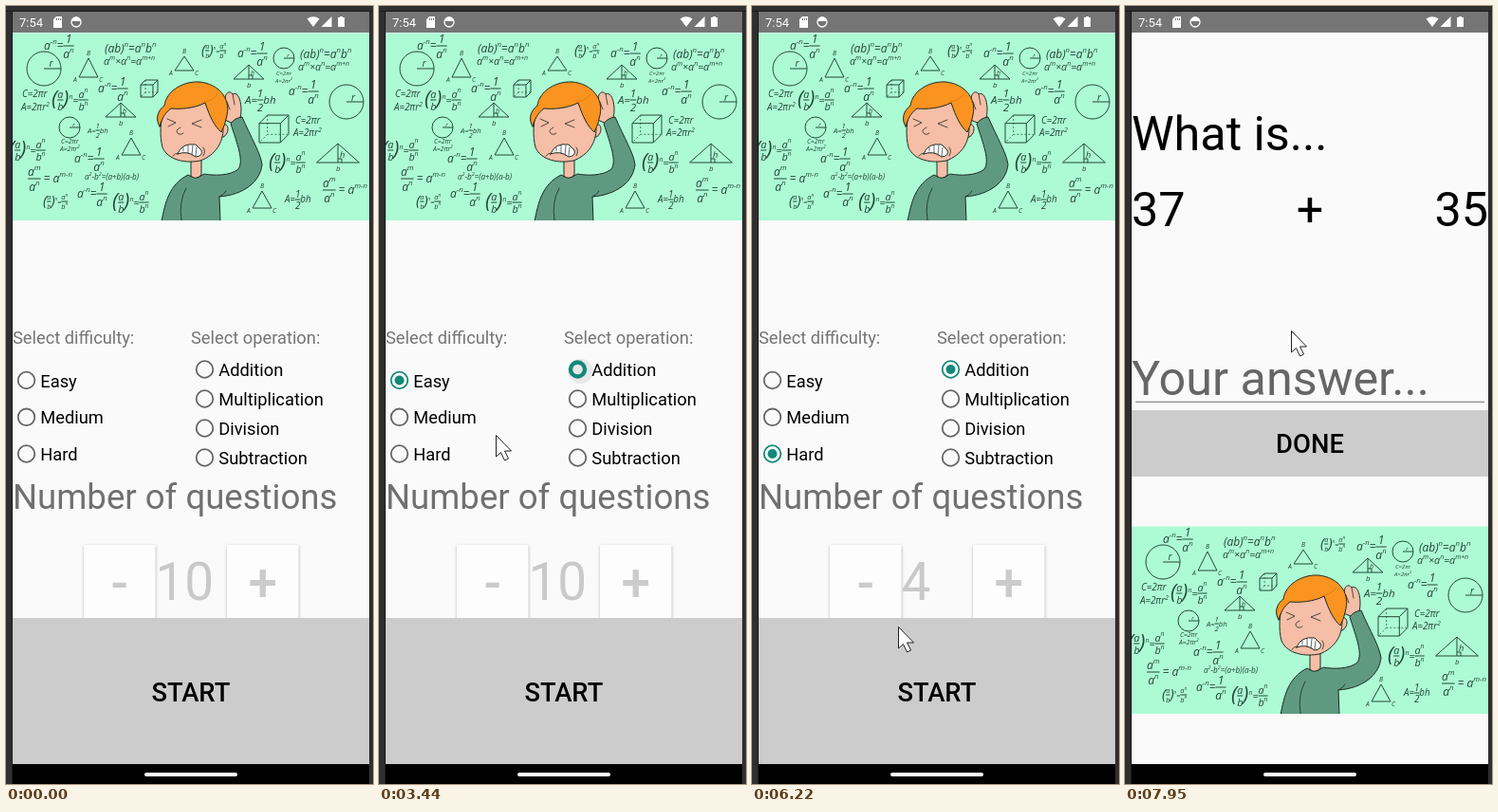
An HTML page with a canvas for the animation above (8 s loop, 387 by 820 pixels).

```html
<!DOCTYPE html>
<html lang="en">
<head>
<meta charset="utf-8">
<title>Math quiz</title>
<style>
html, body { margin: 0; width: 100%; height: 100%; overflow: hidden; background: #2d2d2d; }
canvas { display: block; }
</style>
</head>
<body>
<canvas id="stage" width="387" height="820"></canvas>
<script>
const LOOP = 8000, W = 387, H = 820;
const LEFT = 7, RIGHT = 383;
const INK = '#23483a', PAPER = '#fafafa', MINT = '#adfbd4', BUTTON = '#cccccc', ACCENT = '#12897a';
const stage = document.getElementById('stage').getContext('2d');
let g = stage;

const clamp = v => Math.max(0, Math.min(1, v));

function rect(x, y, w, h, color) {
  g.fillStyle = color;
  g.fillRect(x, y, w, h);
}

function text(s, x, y, size, color, align = 'left', weight = 400) {
  g.font = `${weight} ${size}px Roboto, sans-serif`;
  g.textAlign = align;
  g.fillStyle = color;
  g.fillText(s, x, y);
}

function disc(x, y, r, color) {
  g.beginPath();
  g.arc(x, y, r, 0, 7);
  g.fillStyle = color;
  g.fill();
}

function ring(x, y, r, color, width) {
  g.beginPath();
  g.arc(x, y, r, 0, 7);
  g.lineWidth = width;
  g.strokeStyle = color;
  g.stroke();
}

function shape(d, fill, stroke, width = 1) {
  const path = new Path2D(d);
  if (fill) { g.fillStyle = fill; g.fill(path); }
  if (stroke) { g.strokeStyle = stroke; g.lineWidth = width; g.stroke(path); }
}

function layer(draw) {
  const canvas = document.createElement('canvas');
  canvas.width = W;
  canvas.height = H;
  const previous = g;
  g = canvas.getContext('2d');
  draw();
  g = previous;
  return canvas;
}

// Formula markup: ^c raises a character, {p|q} stacks a fraction, [ ] are tall brackets.
function math(s, x, y, size, dry = false) {
  const start = x;
  const glyph = (c, scale, rise) => {
    g.font = `italic ${size * scale * .86}px "Open Sans", sans-serif`;
    g.textAlign = 'left';
    g.fillStyle = INK;
    if (!dry) g.fillText(c, x, y + rise * size);
    x += g.measureText(c).width;
  };
  for (const token of s.match(/\{[^}]*\}|\^.|./g)) {
    if (token[0] === '{') {
      const [top, bottom] = token.slice(1, -1).split('|');
      const a = math(top, 0, 0, size, true), b = math(bottom, 0, 0, size, true);
      const w = Math.max(a, b);
      if (!dry) {
        math(top, x + (w - a) / 2, y - size * .5, size);
        math(bottom, x + (w - b) / 2, y + size * .6, size);
        shape(`M${x} ${y}h${w}`, null, INK);
      }
      x += w;
    } else if (token[0] === '^') glyph(token[1], .65, -.12);
    else if (token === '[') glyph('(', 2, .5);
    else if (token === ']') glyph(')', 2, .5);
    else glyph(token, 1, .3);
  }
  return x - start;
}

const INVERSE = 'a^-^n={1|a^n}', POWER = '[{a|b}]^n={a^n|b^n}', AREA = 'A={1|2}bh';
const PRODUCT = '(ab)^n=a^nb^n', SUM = 'a^m×a^n=a^m^+^n', QUOTIENT = '{a^m|a^n} = a^m^-^n';

function circleNote(x, y, r, tx, ty, size, gap) {
  ring(x, y, r, INK, 1);
  shape(`M${x} ${y}h${r}`, null, INK);
  math('r', x + r * .3, y - r * .3, r * .65);
  math('C=2πr', tx, ty, size);
  math('A=2πr^2', tx - 1, ty + gap, size);
}

function abcTriangle(x, y, h) {
  shape(`M${x} ${y}l-10 ${h}h20z`, null, INK);
  math('B', x - 2, y - 5, 8);
  math('A', x - 16, y + h + 3, 8);
  math('C', x + 11, y + h + 3, 8);
}

function heightTriangle(x, y, w, h) {
  shape(`M${x} ${y}l${-w / 2} ${h}h${w}zv${h}m0 -4h4v4`, null, INK);
  math('h', x + 2, y + h * .6, h * .55);
  math('b', x - 2, y + h + 6, 9);
}

function cube(x, y, w, h) {
  const d = w * .28, s = w - d, v = h - d;
  shape(`M${x} ${y + d}h${s}v${v}h${-s}zl${d} ${-d}h${s}v${v}l${-d} ${d}m0 ${-v}l${d} ${-d}`, null, INK);
  g.setLineDash([2, 2]);
  shape(`M${x + d} ${y}v${v}h${s}m${-s} 0l${-d} ${d}`, null, INK, .7);
  g.setLineDash([]);
}

function doodles() {
  const put = (s, size, ...spots) => spots.forEach(([x, y]) => math(s, x, y, size));
  put(INVERSE, 14, [40, 42], [97, 87], [72, 161], [75, 198], [244, 50], [298, 90]);
  put(POWER, 12.5, [48, 99], [3, 152], [112, 207], [277, 165]);
  put(POWER, 8.5, [39, 206], [206, 47]);
  put(PRODUCT, 14, [104, 45], [310, 51]);
  put(SUM, 12.5, [103, 58], [308, 64]);
  put(QUOTIENT, 14, [23, 182], [334, 194]);
  put(AREA, 13.5, [252, 99]);
  put(AREA, 11.5, [294, 204]);
  put(AREA, 9, [86, 131]);
  put('a^2-b^2=(a+b)(a-b)', 9.5, [83, 180]);
  circleNote(40, 66, 18, 17, 93, 11.5, 14);
  circleNote(67, 128, 11, 58, 143, 8, 8);
  circleNote(293, 55, 11, 285, 71, 7, 8);
  ring(359, 101, 18, INK, 1);
  shape('M359 101h18', null, INK);
  math('r', 364, 96, 12);
  math('C=2πr', 305, 121, 11.5);
  math('A=2πr^2', 303, 134, 11.5);
  abcTriangle(87, 55, 20);
  abcTriangle(188, 53, 15);
  abcTriangle(132, 139, 18);
  abcTriangle(270, 195, 18);
  heightTriangle(121, 102, 32, 15);
  heightTriangle(256, 62, 32, 15);
  heightTriangle(350, 145, 45, 20);
  cube(142, 78, 18, 18);
  cube(267, 115, 31, 29);
}

function boy() {
  const line = '#1d2a24', skin = '#f6bea6', green = '#5f9a80';
  g.lineJoin = g.lineCap = 'round';
  shape('M231 120C225 111 226 104 232 102C229 92 236 88 239 93C246 89 250 106 247 118L241 124Z', skin, line);
  shape('M233 101l3 8m3 -16l2 11', null, line, .8);
  shape('M164 227C168 207 172 188 192 178Q200 184 209 177C220 179 236 179 245 172C251 163 244 146 237 124Q241 118 249 117C259 140 268 154 270 167C268 186 250 199 225 201L226 227Z', green, line);
  shape('M190 192q-8 14 -5 34m40 -25q5 -2 7 -6', null, line, .8);
  shape('M195 158V179Q200 184 206 178V157Z', skin, line);
  shape('M227 127c5 -6 9 1 6 7q-4 7 -8 3z', skin, line);
  shape('M168 106C162 120 162 138 165 149C171 163 190 166 205 163C221 157 229 144 229 129L218 98Z', skin, line);
  shape('M162 127C157 119 160 110 167 105C169 90 186 79 204 80C224 82 237 97 233 115Q231 126 227 133C220 127 215 117 210 102C199 108 183 109 174 108C167 113 164 120 162 127Z', '#fa931f', line);
  shape('M209 101q9 -1 14 -8', null, '#d97711', .8);
  shape('M170 119l9 4l-8 4m35 -7l-10 4l10 4', null, line, .8);
  shape('M184 128q-7 3 -2 7q3 1 5 -1', null, line, .8);
  shape('M181 156Q185 144 200 146L206 152Q208 158 200 159Q191 152 181 156Z', '#fff', line);
  shape('M187 149l0 4m5 -6l0 8m5 -8l-1 10m5 -8l-1 9', null, line, .7);
  shape('M176 158q3 -3 5 -3m27 -6q3 4 0 9', null, line, .8);
}

const banner = layer(() => {
  doodles();
  boy();
});

function drawBanner(top) {
  const height = 197.5;
  rect(-50, top, W + 100, height, MINT);
  g.save();
  g.beginPath();
  g.rect(-50, top, W + 100, height);
  g.clip();
  g.drawImage(banner, 0, Math.round(top) - 29);
  g.restore();
}

const question = layer(() => {
  const size = 50.3;
  rect(0, 0, W, H, PAPER);
  text('What is...', 7, 152, size, '#000');
  text('37', 7, 232, size, '#000');
  text('+', 195, 232, size, '#000', 'center');
  text('35', RIGHT, 232, size, '#000', 'right');
  text('Your answer...', 7, 410, size, '#666');
  rect(11, 416.7, 368, 1.2, '#858585');
  rect(0, 426, W, 70, BUTTON);
  text('DONE', 195, 471, 27.4, '#000', 'center', 500);
  drawBanner(548.5);
});

// age: time since the option was chosen, negative while it is not.
function radio(label, x, y, age = -1) {
  const on = age >= 0, p = clamp(age / 240);
  if (on && age < 380) disc(x + 3, y + 2, 10 + 7 * p, `rgba(0,0,0,${.1 * (1 - age / 380)})`);
  const width = on && p < 1 ? 2 + 2.4 * Math.sin(p * Math.PI) : 1.8;
  ring(x, y, 9 - width / 2 + .7, on ? ACCENT : '#656565', width);
  if (on && p > .6) disc(x, y, 5 * clamp((p - .6) / .3), ACCENT);
  text(label, x + 14.8, y + 7, 18.3, '#000');
}

function stepButton(label, x) {
  g.save();
  g.shadowColor = 'rgba(0,0,0,.25)';
  g.shadowBlur = 3;
  g.shadowOffsetY = 1;
  rect(x, 568, 75.5, 90, '#fdfdfd');
  g.restore();
  text(label, x + 37.8, 627, 54.9, '#cbcbcb', 'center', 500);
}

const EASY_AT = 2600, ADD_AT = 3330, HARD_AT = 4200;
const COUNT_TIMES = [4760, 4830, 4970, 5110, 5320, 5670];

function setup(t) {
  rect(-50, 28, W + 100, 772, PAPER);
  drawBanner(28.5);
  text('Select difficulty:', 7, 356, 18.3, '#757575');
  text('Select operation:', 195, 356, 18.3, '#757575');
  radio('Easy', 21.5, 394.5, t < HARD_AT ? t - EASY_AT : -1);
  radio('Medium', 21.5, 433.3);
  radio('Hard', 21.5, 472, t - HARD_AT);
  radio('Addition', 209.5, 383, t - ADD_AT);
  ['Multiplication', 'Division', 'Subtraction'].forEach((s, i) => radio(s, 209.5, 414 + 31 * i));
  text('Number of questions', 7, 530, 36.6, '#707070');
  stepButton('-', 82);
  stepButton('+', 233);
  const count = 10 - COUNT_TIMES.filter(at => t >= at).length;
  text(count, 157.5, 626, 54.9, '#c9c9c9');
  rect(-50, 645, W + 100, 154, BUTTON);
  text('START', 195, 733, 27.4, '#000', 'center', 500);
}

function device() {
  rect(0, 0, W, H, '#2f2f2f');
  rect(0, 5, W, 1, '#1b1b1b');
  rect(LEFT - 1, 6, 1, H, '#1b1b1b');
  rect(LEFT, 6, RIGHT - LEFT, 22, '#757575');
  text('7:54', 14, 22, 13, '#fff');
  shape('M53 11h6v12h-9v-9z', '#fff');
  rect(53, 13, 1, 2, '#757575');
  rect(55, 13, 1, 2, '#757575');
  rect(57, 13, 1, 2, '#757575');
  ring(74, 17, 5, '#fff', 1.3);
  shape('M69.5 16q0 -4.5 4.5 -4.5t4.5 4.5z', '#fff');
  shape('M317.5 13.5Q324 9 330.5 13.5L324 22Z', '#fff');
  shape('M343.5 11v11h-11z', '#fff');
  shape('M350 12h2v-1h3v1h2v10h-7z', '#fff');
  rect(LEFT, 799, RIGHT - LEFT, 21, '#000');
  g.beginPath();
  g.roundRect(146, 808, 98, 4, 2);
  g.fillStyle = '#fff';
  g.fill();
}

const PATH = [
  [520, 261, 664], [940, 150, 291], [1290, 116, 429], [1710, 107, 413], [2130, 54, 399],
  [2670, 54, 399], [3020, 226, 383], [3300, 226, 383], [3440, 123, 452], [3860, 30, 484],
  [4270, 30, 484], [4620, 106, 605], [5110, 106, 602], [5670, 106, 602], [6430, 180, 682],
  [6500, 186, 701], [6970, 187, 702], [7180, 187, 695], [7740, 205, 372], [7950, 175, 342]
];
const PRESSES = [
  [2530, 2670], [3090, 3300], [4000, 4200], [4620, 4690], [4760, 4830], [4900, 4970], [5110, 5180], [6570, 6700]
];

function cursor(t) {
  if (t < PATH[0][0]) return;
  const i = PATH.findLastIndex(key => key[0] <= t);
  const [t0, x0, y0] = PATH[i], [t1, x1, y1] = PATH[i + 1] || PATH[i];
  const p = t1 > t0 ? (t - t0) / (t1 - t0) : 0;
  const x = Math.round(x0 + (x1 - x0) * p), y = Math.round(y0 + (y1 - y0) * p);
  if (PRESSES.some(([from, to]) => t >= from && t < to)) disc(x, y, 18, 'rgba(255,255,90,.78)');
  shape(`M${x + .5} ${y + .5}v22.5l5 -4.5l4 8.5l4 -2l-4 -8h7z`, '#fff', '#222');
}

const RHYTHM = [520, 2530, 4200, 5110, 6430, 6970];
function captureTime(t) {
  const base = RHYTHM.findLast(start => start <= t) ?? 0;
  return base + Math.floor((t - base) / 70) * 70;
}

const SWITCH_AT = 6970;

function render() {
  const t = captureTime(performance.now() % LOOP);
  const since = t - SWITCH_AT;
  device();
  g.save();
  g.beginPath();
  g.rect(LEFT, 28, RIGHT - LEFT, 771);
  g.clip();
  if (since < 140) {
    g.save();
    if (since >= 0) g.translate(-4.6 - since * .2, 0);
    setup(t);
    g.restore();
  }
  if (since >= 0) {
    const shift = Math.round(38 * Math.exp(-since * .0145));
    g.globalAlpha = clamp((since - 20) / 80);
    rect(0, 28, W, 771, PAPER);
    rect(0, 426, shift, 70, BUTTON);
    rect(0, 549, shift, 197, MINT);
    g.drawImage(question, shift, 0);
    g.globalAlpha = 1;
  }
  cursor(t);
  g.restore();
  requestAnimationFrame(render);
}
render();
</script>
</body>
</html>
```
